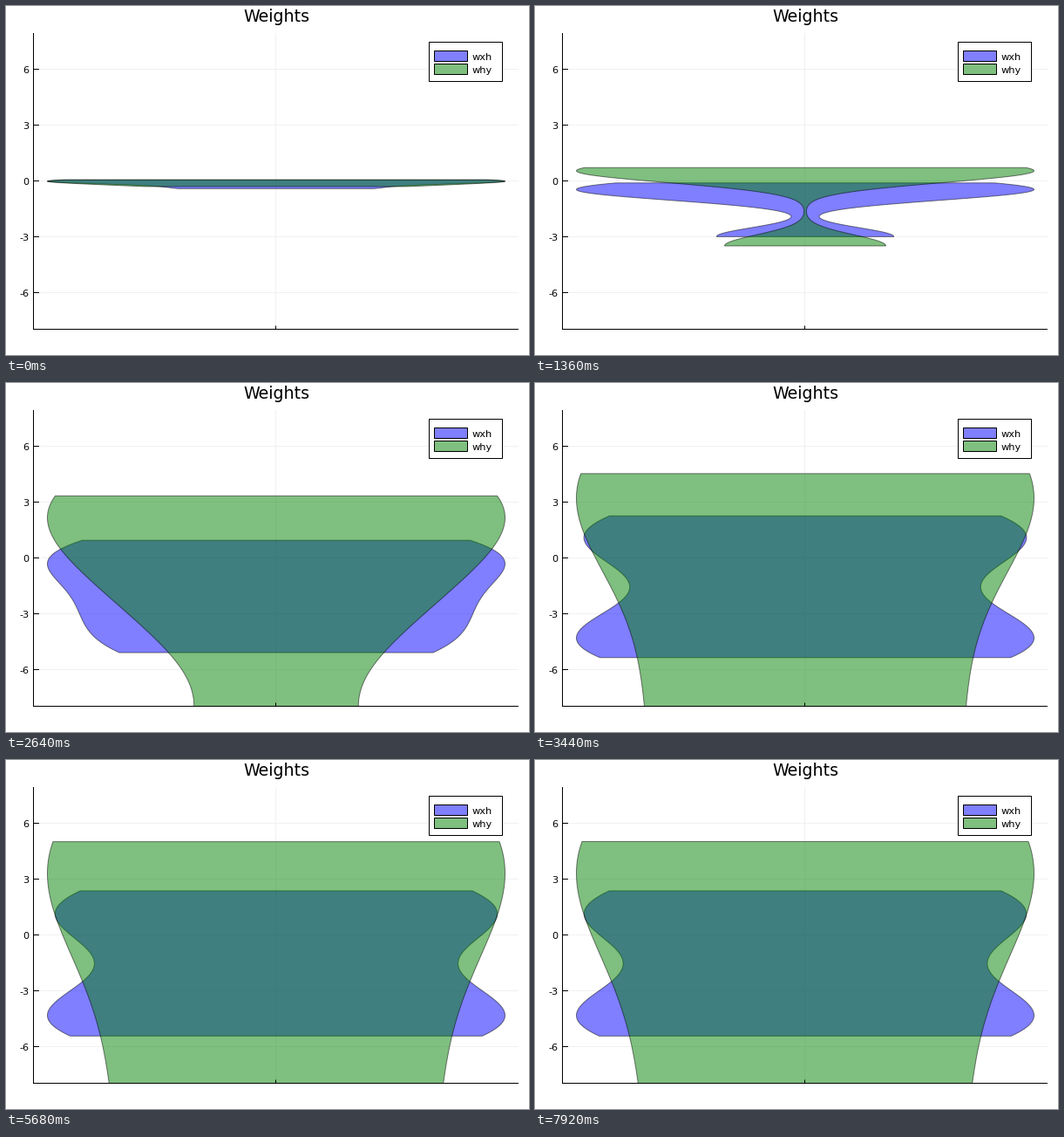
Recreate the animation shown at these times as a matplotlib script. Size 600 by 400 pixels, loop 8000 ms.

```python
import numpy as np
import matplotlib.pyplot as plt
from matplotlib.animation import FuncAnimation
from matplotlib.patches import Rectangle

W, H, DPI = 600, 400, 100
FRAMES, INTERVAL = 100, 80
LEFT, RIGHT, TOP, BOTTOM = 31.5, 588, 31, 370.5
MID, HALF = 310, 262.5          # violin centre and largest half-width
ZERO, UNIT = 201.3, 21.31       # pixel row of 0 and pixels per unit
PX = 72 / DPI                   # one pixel in points

BLUE, GREEN = (0, 0, 1, 0.5), (0, 0.5, 0, 0.5)
GRID = "#f1f1f1"


def ramp(t, middle, rate=0.155):
    """Logistic step: how far a learned value has moved by step t."""
    return 1 / (1 + np.exp(-rate * (t - middle)))


def turns(t):
    """The two fast stages of training: a first drift, then a split."""
    return ramp(t, 20, 0.25), ramp(t, 33, 0.32)


def wxh(t):
    drift, split = turns(t)
    weights = [0.10 - 0.58 * drift + 2.89 * split,
               0.06 - 1.59 * drift + 1.89 * split,
               -0.06 - 2.07 * drift - 1.47 * split,
               0.07 - 5.47 * ramp(t, 15.6)]
    return np.array(weights), 0.12 + 1.84 * ramp(t, 26)


def why(t):
    drift, split = turns(t)
    high = 0.04 + 5.02 * ramp(t, 28.6)
    weights = [high,
               0.9 * high,
               -0.08 + 1.32 * drift - 7.94 * split,
               0.05 - 16.4 * ramp(t, 25.4)]
    return np.array(weights), 0.13 + 6.07 * ramp(t, 31.3, 0.174)


def violin(weights, band):
    """Outline of the kernel density, cut at the extreme weights."""
    y = np.linspace(weights.min(), weights.max(), 200)
    dens = np.exp(-((y[:, None] - weights) / band) ** 2 / 2).sum(axis=1)
    half = HALF * dens / dens.max()
    rows = ZERO - UNIT * y
    return np.column_stack([np.r_[MID + half, (MID - half)[::-1]],
                            np.r_[rows, rows[::-1]]])


fig = plt.figure(figsize=(W / DPI, H / DPI), dpi=DPI, facecolor="white")
ax = fig.add_axes([0, 0, 1, 1])
ax.set_xlim(0, W)
ax.set_ylim(H, 0)
ax.axis("off")


def line(x, y, color="black", z=5):
    ax.plot(x, y, color=color, lw=PX, zorder=z, snap=False,
            solid_capstyle="butt")


def box(x, y, w, h, fill, z):
    ax.add_patch(Rectangle((x, y), w, h, fc=fill, ec="black", lw=PX,
                           zorder=z, snap=False))


def label(x, y, text, size, align="left"):
    ax.text(x, y, text, fontsize=size * PX, family="DejaVu Sans",
            ha=align, va="baseline", zorder=8)


for v in range(-6, 7, 3):
    row = round(ZERO - UNIT * v) - 0.5
    line([LEFT, RIGHT], [row, row], GRID, 1)
    line([LEFT, LEFT + 6.5], [row, row])
    label(26.3, row + 4.8, str(v), 11.2, "right")
line([309.5, 309.5], [TOP, BOTTOM], GRID, 1)
line([309.5, 309.5], [BOTTOM, BOTTOM - 4])
line([LEFT, LEFT], [TOP, BOTTOM + 0.5])
line([LEFT, RIGHT], [BOTTOM, BOTTOM])
label(310, 18, "Weights", 19, "center")

box(485.5, 41.5, 84, 45, "white", 6)
for row, text, color in ((51.5, "wxh", BLUE), (66.5, "why", GREEN)):
    box(491.5, row, 38, 12, color, 7)
    label(534.7, row + 10.3, text, 11.4)

plot_area = Rectangle((LEFT, TOP), RIGHT - LEFT, BOTTOM - TOP,
                      transform=ax.transData)
series = []
for learn, color, z in ((wxh, BLUE, 2), (why, GREEN, 3)):
    shape, = ax.fill([0, 1, 1], [0, 0, 1], fc=color, ec=(0, 0, 0, 0.5),
                     lw=PX, zorder=z)
    shape.set_clip_path(plot_area)
    series.append((shape, learn))


def draw(t):
    for shape, learn in series:
        shape.set_xy(violin(*learn(t)))
    return [shape for shape, _ in series]


anim = FuncAnimation(fig, draw, frames=FRAMES, interval=INTERVAL,
                     repeat=True, repeat_delay=0)
plt.show()
```
